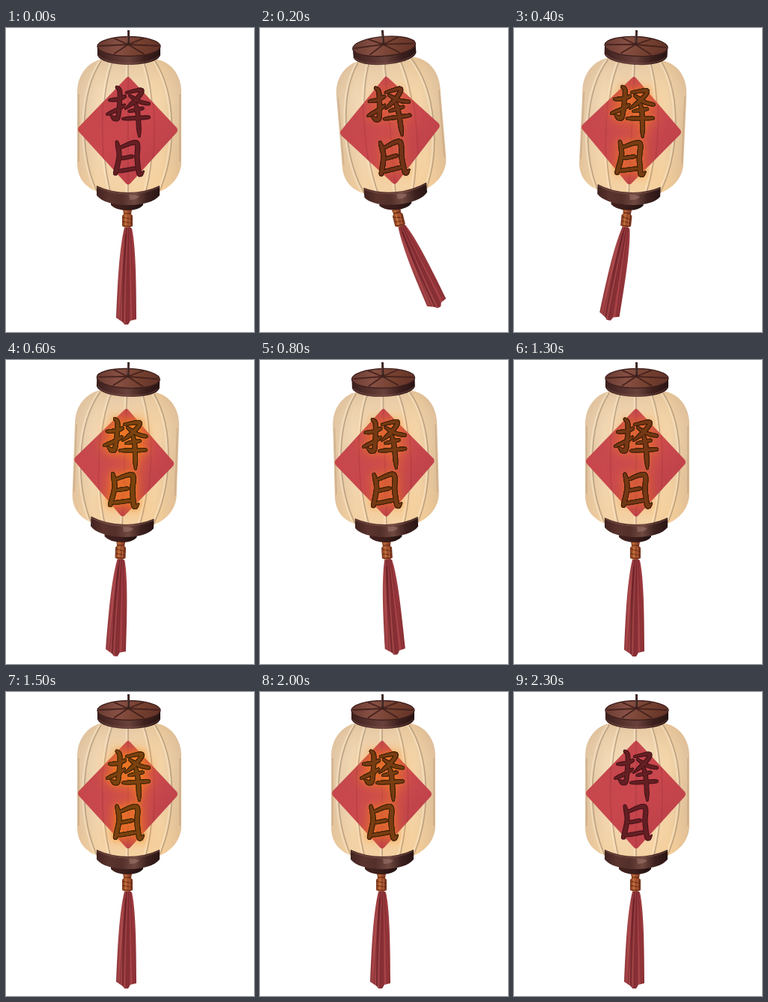
An HTML page with a canvas for the animation above (7300 ms loop, 331 by 405 pixels).

```html
<!DOCTYPE html>
<html lang="zh">
<head>
<meta charset="utf-8">
<title>择日</title>
<style>
html, body { margin: 0; width: 100%; height: 100%; overflow: hidden; background: #fff; }
canvas { display: block; width: 331px; height: 405px; }
</style>
</head>
<body>
<canvas id="stage" role="img" aria-label="择日"></canvas>
<script>
const W = 331, H = 405, LOOP = 7300;
const canvas = document.getElementById('stage');
const ctx = canvas.getContext('2d');
const dpr = window.devicePixelRatio || 1;
canvas.width = W * dpr;
canvas.height = H * dpr;

// degrees, one value per 100 ms
const swing = [0, -2.5, -4.8, -1.6, 2.6, 4.7, 2.1, 0, -1.6, -.7, 1.2];
const trail = [0, -9, -21, -9, 7, 14, 0, -3, -4, -1, 1.5];
const glowKeys = [[0, 0], [600, 1], [1100, 0], [1500, 1], [1900, 1], [2300, 0]];

function glowAt(t) {
  const i = glowKeys.findIndex(k => k[0] >= t);
  if (i < 1) return 0;
  const [t0, a] = glowKeys[i - 1], [t1, b] = glowKeys[i];
  return a + (b - a) * (t - t0) / (t1 - t0);
}

// brush strokes: width, end taper, points
const brushes = [
  [6, .8, '138,96 149,95 159,91'],
  [7, .3, '148,79 152,86 150,116 146,121 139,116'],
  [6, .4, '135,115 148,109 159,102'],
  [6.4, .4, '161,86 181,83 174,95 159,108'],
  [6, .8, '165,90 178,98 191,101'],
  [5.5, .8, '164,111 183,107'],
  [6, .8, '156,121 174,120 191,119'],
  [7, .5, '173,101 176,115 178,145'],
  [7.2, .9, '148,152 151,170 146,194'],
  [7.4, .3, '153,159 174,153 175,174 178,194 184,191'],
  [5.8, .8, '153,174 169,171'],
  [6.2, .8, '149,191 173,187']
].map(([w, tip, p]) => ({ w, tip, pts: p.split(' ').map(s => s.split(',').map(Number)) }));

function spline(a, b, c, d, u) {
  return .5 * (2 * b + (c - a) * u + (2 * a - 5 * b + 4 * c - d) * u * u + (3 * b - a - 3 * c + d) * u * u * u);
}

function brushPath(inset) {
  const path = new Path2D();
  for (const { w, tip, pts } of brushes) {
    const n = pts.length - 1;
    const at = i => pts[Math.max(0, Math.min(n, i))];
    for (let i = 0; i < n; i++) {
      for (let u = 0; u <= 1; u += .04) {
        const [x, y] = [0, 1].map(k => spline(at(i - 1)[k], at(i)[k], at(i + 1)[k], at(i + 2)[k], u));
        const s = (i + u) / n;
        const ends = s < .25 ? .68 + 1.28 * s : s > .8 ? 1 + (tip - 1) * (s - .8) * 5 : 1;
        const r = Math.max(.4, w * ends / 2 - inset);
        path.moveTo(x + r, y);
        path.arc(x, y, r, 0, Math.PI * 2);
      }
    }
  }
  return path;
}

const inkEdge = brushPath(0), inkCore = brushPath(1);
const body = new Path2D('M122 43C105 50 95 66 95 86V180C95 199 105 212 122 218Q163 228 205 218C222 211 234 196 234 178V86C234 66 224 49 206 43Q164 32 122 43Z');
const diamond = new Path2D('M160 67Q163 63 166 67L228 133Q230 136 228 139L166 207Q163 210 160 207L97 138Q95 135 97 132Z');
const tassel = new Path2D('M158 266Q163 263 168 267C172 285 174 320 174 388L166 390L163 395H158L156 392L147 386C149 340 151 295 158 266Z');

function gradient(x0, y0, x1, y1, ...colors) {
  const g = ctx.createLinearGradient(x0, y0, x1, y1);
  colors.forEach((c, i) => g.addColorStop(i / (colors.length - 1), c));
  return g;
}

function fill(path, style) {
  ctx.fillStyle = style;
  ctx.fill(typeof path === 'string' ? new Path2D(path) : path);
}

function line(path, style, width) {
  ctx.strokeStyle = style;
  ctx.lineWidth = width;
  ctx.stroke(new Path2D(path));
}

function turn(x, y, deg, stretch = 1) {
  ctx.translate(x, y);
  ctx.rotate(deg * Math.PI / 180);
  ctx.scale(1, stretch);
  ctx.translate(-x, -y);
}

const mix = (a, b, k) => `rgb(${a.map((v, i) => Math.round(v + (b[i] - v) * k))})`;

function drawRibs() {
  for (const k of [-58, -33, 0, 33, 58]) {
    const rib = s => `M${163 + k * .62 + s} 44C${163 + k * 1.12 + s} 88 ${163 + k * 1.12 + s} 168 ${163 + k * .7 + s} 220`;
    line(rib(-2), 'rgba(255,244,218,.35)', 3);
    line(rib(0), 'rgba(150,122,95,.5)', 1.8);
  }
}

function drawText(glow) {
  const k = Math.sqrt(glow);
  const edge = mix([66, 18, 23], [66, 37, 8], k);
  ctx.save();
  ctx.clip(body);
  for (const [blur, a] of glow ? [[24, .8], [13, .75], [5, .45]] : []) {
    ctx.shadowColor = `rgba(250,132,22,${a * glow})`;
    ctx.shadowBlur = blur * dpr;
    fill(inkEdge, edge);
  }
  ctx.shadowColor = 'transparent';
  fill(inkEdge, edge);
  fill(inkCore, mix([100, 31, 35], [123, 66, 14], k));
  ctx.restore();
}

function drawBody(glow) {
  fill(body, gradient(95, 0, 234, 0, '#dfc29f', '#f1d7b2', '#f2d8b4', '#f4d9b2', '#f3d3a5', '#dcbd98'));
  ctx.save();
  ctx.clip(body);
  fill(body, gradient(0, 40, 0, 222, '#be966e4d', '#ffebcd1a', '#fac8870d', '#f7c28052'));
  drawRibs();
  ctx.restore();
  line('M97 88V178M232 88V178', '#aa89694d', 2);

  fill(diamond, gradient(120, 80, 205, 190, '#c4474c', '#c9474d', '#bd4149'));
  ctx.save();
  ctx.clip(diamond);
  line('M130 90Q127 135 131 185M163 62V212M196 90Q200 135 196 185', '#87263440', 1.6);
  ctx.restore();
  drawText(glow);
}

function drawTop() {
  fill('M122 25V36C124 44 142 49 164 49S204 44 206 36V25Z',
    gradient(122, 0, 206, 0, '#3b1f1d', '#54302c', '#69413b', '#3d201e', '#281413'));
  line('M124 37C131 44 147 47 164 47S197 44 204 37', '#94665b73', 1);
  ctx.beginPath();
  ctx.ellipse(164, 24.5, 42, 13, 0, 0, Math.PI * 2);
  ctx.fillStyle = gradient(122, 16, 206, 34, '#673930', '#875044', '#74402f', '#623228');
  ctx.fill();
  ctx.strokeStyle = '#3f211e';
  ctx.lineWidth = 1.4;
  ctx.stroke();
  for (let i = 0; i < 6; i++) {
    const a = i * Math.PI / 3;
    line(`M163 22L${164 + 40 * Math.cos(a)} ${24 + 12 * Math.sin(a)}`, '#46231e', 1.8);
  }
  line('M163.5 3V23', '#38211f', 3);
  line('M162.7 5V19', '#75544d', .7);
}

function drawBottom() {
  fill('M140 230H183V236Q177 243 162 243T140 236Z', gradient(140, 0, 183, 0, '#41211e', '#3a1d1b', '#1f1110'));
  fill('M121 210Q140 219 163 219T205 210V223C199 231 183 236 163 236S127 231 121 223Z',
    gradient(121, 0, 205, 0, '#422320', '#5a332d', '#54302b', '#704940', '#3d211f', '#2a1514'));
  line('M122 212Q140 221 163 221T204 212', '#895b4f99', 1.2);
  fill('M164 222Q174 222 178 224Q176 229 165 229Z', '#b7908460');
}

function drawTassel(angle) {
  ctx.save();
  turn(162, 243, angle * .45);
  ctx.save();
  turn(162, 262, angle * .55, 1 - Math.abs(angle) * .0035);
  fill(tassel, gradient(147, 0, 175, 0, '#8f363a', '#a9484a', '#883136', '#a23e42', '#8b3035'));
  ctx.clip(tassel);
  for (let i = 0; i < 9; i++) {
    const strand = `M${160 + i * .8} 266Q${154 + i * 2} 315 ${149 + i * 3} 395`;
    line(strand, i % 3 ? '#5b161e66' : '#c4635f59', i % 2 ? 1.2 : .8);
  }
  line('M160 275Q156 325 156 394', '#57171d73', 2.2);
  ctx.restore();
  fill('M156 242H168L167 248L169 250V264Q162 268 155 264V250L157 248Z',
    gradient(155, 0, 169, 0, '#7a351e', '#bd6834', '#94452a', '#713018'));
  line('M157 247H167M156 252L168 255M156 258L168 260M157 264H167', '#5d2719', 1.2);
  line('M160 250V263M165 249V264', '#e08746a6', .9);
  ctx.restore();
}

function draw(t) {
  const i = Math.floor(t / 100);
  const held = t < 1500 ? i : t < 2000 ? 15 : Math.min(23, i);
  ctx.setTransform(dpr, 0, 0, dpr, 0, 0);
  ctx.fillStyle = '#fff';
  ctx.fillRect(0, 0, W, H);
  turn(163, 5, swing[held] || 0);
  drawTassel(trail[held] || 0);
  drawBody(glowAt(held * 100));
  drawBottom();
  drawTop();
}

const start = performance.now();
function tick() {
  draw((performance.now() - start) % LOOP);
  requestAnimationFrame(tick);
}
tick();
</script>
</body>
</html>
```
